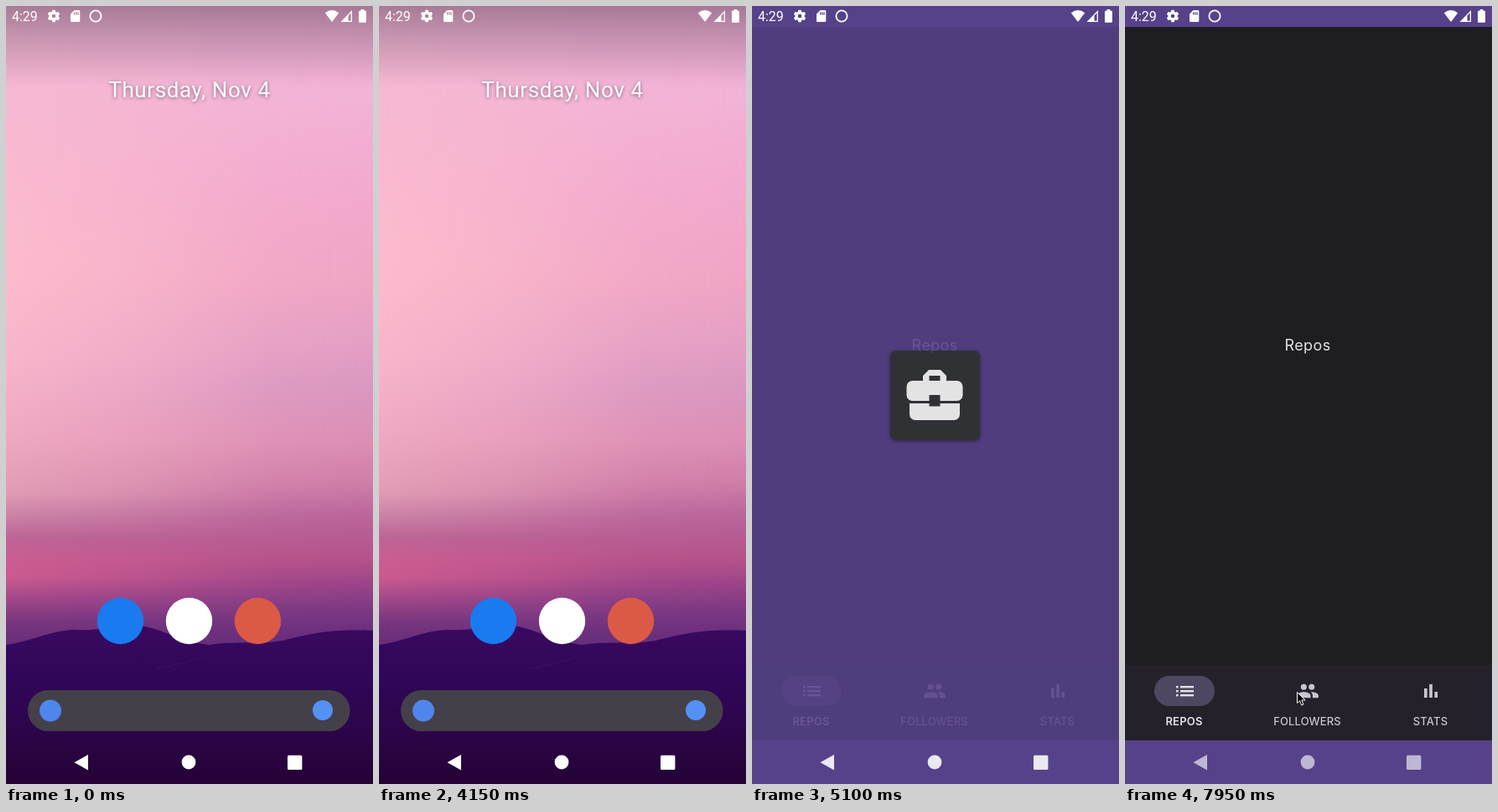
Animation of 438x928 px, one loop 8000 ms. Source, as an HTML page with a canvas:

```html
<!DOCTYPE html>
<html lang="en">
<head>
<meta charset="utf-8">
<title>App launch</title>
<style>
  html, body { margin: 0; width: 100%; height: 100%; overflow: hidden; background: #1e1d22; }
  canvas { display: block; width: 100vw; height: 100vh; }
</style>
</head>
<body>
<canvas id="stage" width="438" height="928"></canvas>
<script>
const W = 438, H = 928, LOOP = 8000, STEP = 50;
const PURPLE = '#56428a';
const ctx = document.getElementById('stage').getContext('2d');

const clamp = v => Math.max(0, Math.min(1, v));
const span = (t, from, to) => clamp((t - from) / (to - from));

function layer(paint) {
  const c = document.createElement('canvas');
  c.width = W;
  c.height = H;
  paint(c.getContext('2d'));
  return c;
}

function gradient(g, stops, horizontal) {
  const size = horizontal ? W : H;
  const fill = horizontal ? g.createLinearGradient(0, 0, W, 0) : g.createLinearGradient(0, 0, 0, H);
  for (const [at, color] of stops) fill.addColorStop(at / size, color);
  return fill;
}

function rect(g, x, y, w, h, color, r = 0) {
  g.fillStyle = color;
  g.beginPath();
  g.roundRect(x, y, w, h, r);
  g.fill();
}

function disc(g, x, y, r, color) {
  g.fillStyle = color;
  g.beginPath();
  g.arc(x, y, r, 0, Math.PI * 2);
  g.fill();
}

function shape(g, d, color, rule = 'nonzero') {
  g.fillStyle = color;
  g.fill(new Path2D(d), rule);
}

function label(g, text, x, y, font, color, spacing = 0, align = 'center') {
  g.font = font;
  g.letterSpacing = spacing + 'px';
  g.textAlign = align;
  g.fillStyle = color;
  g.fillText(text, x, y);
}

function paintSky(g) {
  g.fillStyle = gradient(g, [
    [0, '#f0b4d4'], [100, '#f6b8d2'], [200, '#fab9d0'], [310, '#fcbccd'], [420, '#f8b5cb'],
    [510, '#f0a9c3'], [580, '#e29cb5'], [606, '#cd84a6'], [635, '#bd6595'], [660, '#cb5d92'],
    [682, '#cb5a8f'], [705, '#a64a8a'], [735, '#793680'], [762, '#672e78'], [H, '#672e78']
  ]);
  g.fillRect(0, 0, W, H);
  const right = layer(r => {
    r.fillStyle = gradient(r, [
      [0, '#eeaed4'], [110, '#f2b2d5'], [220, '#f2a9cd'], [330, '#f0a4c4'], [400, '#e49fc3'],
      [455, '#da97c0'], [520, '#dc8eb3'], [565, '#d07fa8'], [610, '#b9649b'], [660, '#b4528b'],
      [690, '#9a4488'], [720, '#7c3983'], [750, '#692f7d'], [H, '#672e78']
    ]);
    r.fillRect(0, 0, W, H);
    r.globalCompositeOperation = 'destination-in';
    r.fillStyle = gradient(r, [[0, '#0000'], [150, '#0005'], [320, '#000d'], [W, '#000']], true);
    r.fillRect(0, 0, W, H);
  });
  g.drawImage(right, 0, 0);
}

function paintHills(g) {
  g.fillStyle = gradient(g, [[0, '#390a60'], [740, '#390a60'], [800, '#30065a'], [865, '#2c0549'], [H, '#250236']]);
  g.beginPath();
  g.moveTo(0, H);
  g.lineTo(0, 762);
  g.bezierCurveTo(30, 758, 50, 746, 80, 744);
  g.bezierCurveTo(110, 746, 130, 738, 160, 739);
  g.bezierCurveTo(190, 744, 205, 757, 242, 762);
  g.bezierCurveTo(275, 757, 300, 762, 330, 757);
  g.bezierCurveTo(365, 748, 390, 743, W, 745);
  g.lineTo(W, H);
  g.fill();
  g.strokeStyle = 'rgba(110, 50, 130, .22)';
  g.beginPath();
  g.moveTo(178, 791);
  g.quadraticCurveTo(210, 785, 234, 777);
  g.stroke();
}

function paintHome(g) {
  paintSky(g);
  paintHills(g);
  g.fillStyle = gradient(g, [[0, 'rgba(40,25,40,.36)'], [30, 'rgba(40,25,40,.24)'], [95, 'rgba(40,25,40,0)']]);
  g.fillRect(0, 0, W, 95);

  g.save();
  g.shadowColor = 'rgba(60, 30, 60, .6)';
  g.shadowBlur = 4;
  g.shadowOffsetY = 1;
  label(g, 'Thursday, Nov 4', 219, 109, '26px Roboto, sans-serif', '#fff', 0.6);
  g.restore();

  disc(g, 136.5, 733.5, 27.7, '#1a7af0');
  disc(g, 218.5, 733.5, 27.7, '#fff');
  disc(g, 300.5, 733.5, 27.7, '#db5a45');
  rect(g, 26, 816, 384.5, 49, '#444049', 24.5);
  disc(g, 53, 840.5, 13, '#4f86ec');
  disc(g, 378, 840, 12, '#5491f5');
}

function paintSplash(g) {
  rect(g, 0, 0, W, H, PURPLE);
  g.save();
  g.shadowColor = 'rgba(0, 0, 0, .45)';
  g.shadowBlur = 4;
  g.shadowOffsetY = 1;
  rect(g, 165, 411, 107, 107, '#333438', 7);
  g.restore();
  shape(g, 'M204 448V441L211 434H225L232 441V448Z M211.5 441V448H224.5V441Z', '#fff', 'evenodd');
  rect(g, 184.5, 447, 67, 24, '#fff', 7);
  rect(g, 188, 474, 60, 20, '#fff', [0, 0, 7, 7]);
  rect(g, 211.5, 464, 13, 13.5, '#333438');
}

function paintApp(g) {
  const soft = '#cac4cf', bright = '#e8e0ec';
  rect(g, 0, 0, W, H, '#1e1d22');
  label(g, 'Repos', 218, 411, '18px Inter, sans-serif', '#e5e1e6', 0.4);

  rect(g, 0, 786, W, 90, '#24212b');
  rect(g, 35, 799, 72, 36, '#4e4761', 18);
  for (const y of [811, 816, 821]) {
    rect(g, 61, y, 2.6, 2.4, bright);
    rect(g, 66, y, 16, 2.4, bright);
  }
  g.save();
  g.translate(204, 803);
  g.scale(1.17, 1.17);
  disc(g, 8, 8, 3, soft);
  disc(g, 16, 8, 3, soft);
  shape(g, 'M8 13c-2.33 0-7 1.17-7 3.5V19h14v-2.5c0-2.33-4.67-3.5-7-3.5z' +
    'M16 13c-.29 0-.62.02-.97.05 1.16.84 1.97 1.97 1.97 3.45V19h6v-2.5c0-2.33-4.67-3.5-7-3.5z', soft);
  g.restore();
  rect(g, 357, 814, 3.7, 11, soft);
  rect(g, 363.2, 809, 3.7, 16, soft);
  rect(g, 369.4, 818, 3.7, 7, soft);

  label(g, 'REPOS', 70.5, 857.5, '600 13px Inter, sans-serif', bright, 0.2);
  label(g, 'FOLLOWERS', 217.5, 857.5, '500 13px Inter, sans-serif', soft, 0.1);
  label(g, 'STATS', 364.5, 857.5, '500 13px Inter, sans-serif', soft, 0.2);

  rect(g, 0, 0, W, 25, PURPLE);
  rect(g, 0, 876, W, 52, PURPLE);
}

function paintStatus(g) {
  label(g, '4:29', 7, 18, '16px Roboto, sans-serif', '#fff', 0, 'left');

  // Gear
  g.save();
  g.translate(57, 12);
  g.strokeStyle = '#fff';
  g.lineWidth = 3.4;
  g.beginPath();
  g.arc(0, 0, 4, 0, Math.PI * 2);
  g.stroke();
  for (let i = 0; i < 6; i++) {
    rect(g, -1.8, -7.3, 3.6, 3, '#fff', 0.5);
    g.rotate(Math.PI / 3);
  }
  g.restore();

  // Memory card
  shape(g, 'M81.5 5H87q1.3 0 1.3 1.3V17.7Q88.3 19 87 19H78.3Q77 19 77 17.7V9.5Z' +
    'M81 7.5V10.5H82.3V7.5Z M83.2 7.5V10.5H84.5V7.5Z M85.4 7.5V10.5H86.7V7.5Z', '#fff', 'evenodd');

  g.strokeStyle = '#fff';
  g.lineWidth = 1.8;
  g.beginPath();
  g.arc(107, 12, 6.6, 0, Math.PI * 2);
  g.stroke();

  // Wi-Fi, signal, battery
  shape(g, 'M389 19L380.8 8.3Q389 1.8 397.2 8.3Z', '#fff');
  shape(g, 'M399.5 19L413 5V19Z M408.5 17.7H411.7V8.2L408.5 11.6Z', '#fff', 'evenodd');
  shape(g, 'M421 6.8Q421 5.7 422 5.7H423.5V4H427.5V5.7H429Q430 5.7 430 6.8V18.7Q430 19.8 429 19.8H422Q421 19.8 421 18.7Z', '#fff');
}

function paintButtons(g) {
  shape(g, 'M81.5 902.3L98 893V911.6Z', '#fff');
  disc(g, 218, 902, 8.4, '#fff');
  rect(g, 336, 893.8, 17.4, 17.2, '#fff', 1.6);
}

const home = layer(paintHome);
const splash = layer(paintSplash);
const app = layer(paintApp);
const status = layer(paintStatus);
const buttons = layer(paintButtons);

function put(image, alpha = 1, scale = 1) {
  ctx.save();
  ctx.globalAlpha = alpha;
  ctx.translate(W / 2, H / 2);
  ctx.scale(scale, scale);
  ctx.drawImage(image, -W / 2, -H / 2);
  ctx.restore();
}

function drawCursor(t) {
  const p = span(t, 7150, 7950);
  const e = 1 - (1 - p) ** 2;
  const x = 205 - 5 * (1 - e) - 38 * e * (1 - e);
  const y = 247 + 571 * e;
  ctx.save();
  ctx.translate(x, y);
  const arrow = new Path2D('M.5 .5V13.5L3.5 10.7L5.8 16L8 15L5.8 10H10Z');
  ctx.fillStyle = '#000';
  ctx.fill(arrow);
  ctx.strokeStyle = '#fff';
  ctx.lineWidth = 1;
  ctx.stroke(arrow);
  ctx.restore();
}

function draw(t) {
  const open = span(t, 4300, 4600);
  const reveal = span(t, 5069, 5325);

  if (t < 4400) put(home);
  if (t > 4300 && reveal < 1) {
    const scale = 0.85 + 0.15 * (1 - (1 - open) ** 2);
    if (t >= 4400) put(home);
    if (reveal === 0) put(splash, span(t, 4300, 4383), scale);
  }
  if (reveal > 0) {
    put(app);
    put(splash, 1 - reveal);
  }

  put(status);
  const dim = 0.12 * span(t, 4400, 4600) + 0.26 * span(t, 6250, 7050);
  put(buttons, 1 - dim);
  if (t >= 7150) drawCursor(t);
}

function tick(now) {
  draw(Math.floor(now % LOOP / STEP) * STEP);
  requestAnimationFrame(tick);
}
requestAnimationFrame(tick);
</script>
</body>
</html>
```
